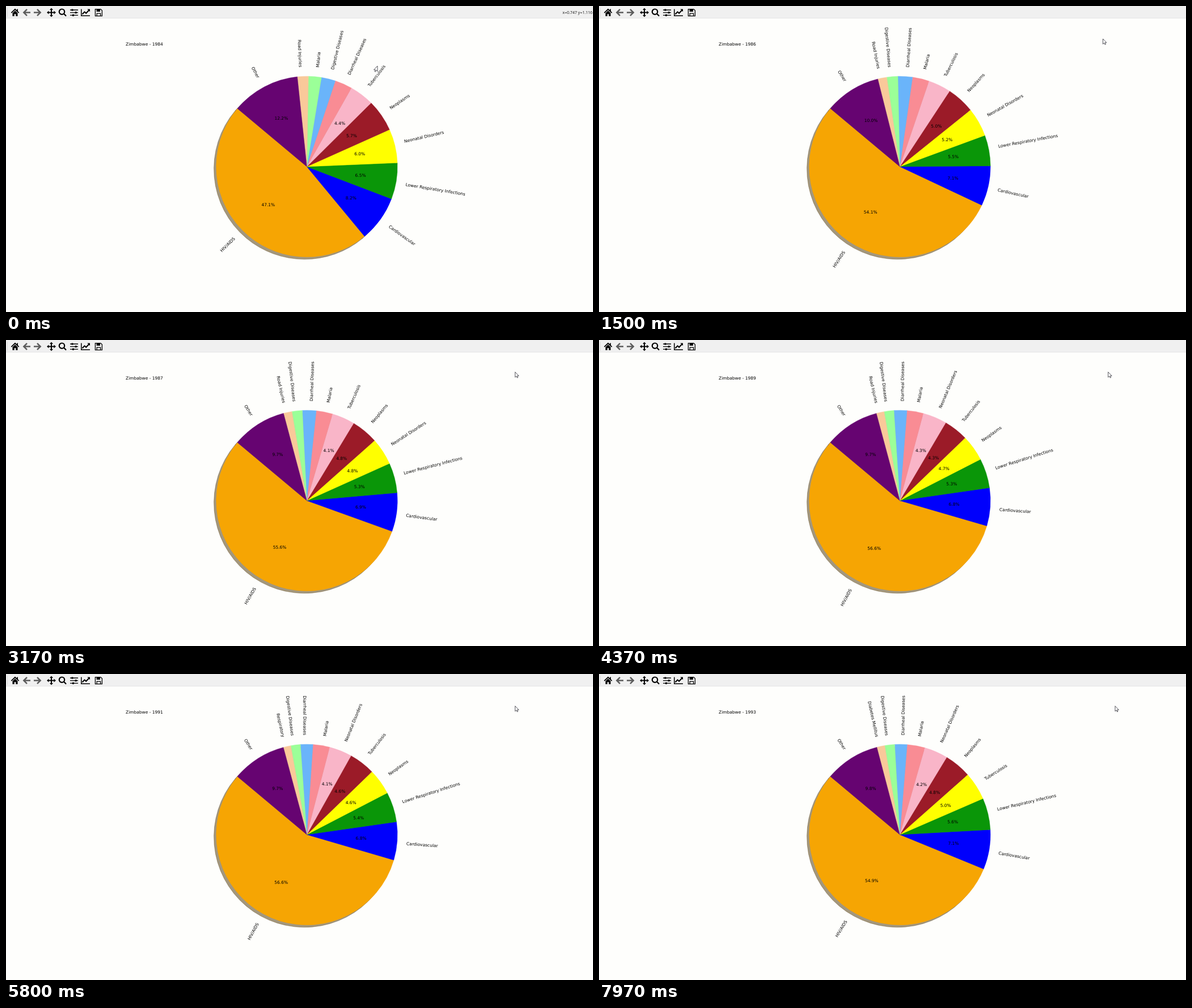
Write an HTML page with a canvas that moves like this. It is 1035 px wide and 541 px high and loops after 8000 ms.

```html
<!DOCTYPE html>
<html lang="en">
<head>
<meta charset="utf-8">
<title>Causes of death by year</title>
<style>
  html, body { margin: 0; width: 100%; height: 100%; overflow: hidden; background: #fefefc; }
  canvas { display: block; }
</style>
</head>
<body>
<canvas id="stage" width="1035" height="541"></canvas>
<script>
const ctx = document.getElementById('stage').getContext('2d');
const LOOP = 8000, FIRST_CHANGE = 637, YEAR_MS = 848;
const CX = 530.4, CY = 284, R = 159.8, START = 140, SHOWN = 10;
const FONT = '7.49px "DejaVu Sans", sans-serif';

const { exp, cos, sin, abs, min, max } = Math;
const rad = deg => deg * Math.PI / 180;
const clamp01 = p => min(1, max(0, p));
const smooth = p => clamp01(p) ** 2 * (3 - 2 * clamp01(p));
const polar = (deg, r) => [CX + r * cos(rad(deg)), CY - r * sin(rad(deg))];

// Steep rise to a plateau, then a late fall; percent, y = years since 1984.
const hivShare = y => 56.88 - 9.78 * exp(-0.555 * y ** 1.18) - 1.97 * exp(y - 9);

// Every other cause is a percentage of what remains.
const CAUSES = {
  'Cardiovascular': y => 15.5 + 0.025 * y,
  'Lower Respiratory Infections': y => 11.75 + 0.085 * y + 0.5 * exp(-y),
  'Neonatal Disorders': y => 11.42 - 2.07 * smooth((y - 1) / 6),
  'Neoplasms': y => 10.85 - 0.025 * y,
  'Tuberculosis': y => 8.25 + 0.25 * y + 0.65 * smooth((y - 1) / 6),
  'Malaria': y => 6.35 + 0.07 * y - 2 * exp(-2 * y),
  'Diarrheal Diseases': y => 5.85 - 0.11 * y,
  'Digestive Diseases': y => 3.9 + 0.85 * exp(-0.4 * y),
  'Road Injuries': y => 3.7 - 0.1 * y,
  'Respiratory': () => 3.05,
  'Diabetes Mellitus': y => 2.5 + 0.07 * y
};

// Colours follow rank; the last one is "Other".
const COLORS = ['#f6a503', '#0000fc', '#0a9608', '#ffff00', '#9b1b28', '#f9b5c8',
  '#f98c94', '#6ab4fa', '#9bff98', '#f9c99a', '#660471'];

// [path, line width, colour]; line width 0 means filled
const ICONS = [
  ['M9.3 12.2L16 5.8 22.7 12.2', 1.7],
  ['M11.5 12.4L16 8.2 20.5 12.4V18H17.3V14.2H14.7V18H11.5ZM19.2 5.5H21V9.5L19.2 8Z', 0],
  ['M43 11.5H32M37 5.8L31.3 11.5 37 17.2', 2.5, '#5c5c5c'],
  ['M49 11.5H60M55 5.8L60.7 11.5 55 17.2', 2.5, '#5c5c5c'],
  ['M74 11.5H86M80 5.5V17.5', 2],
  ['M80 3.5L83 7H77ZM80 19.5L83 16H77ZM72 11.5L75.5 8.5V14.5ZM88 11.5L84.5 8.5V14.5Z', 0],
  ['M103.2 10.2A4.7 4.7 0 1 1 93.8 10.2A4.7 4.7 0 1 1 103.2 10.2M102 13.6L106 17.7', 2.2],
  ['M113 7H127M113 11.7H127M113 16.4H127', 1.3],
  ['M115.4 5.4H118.4V8.6H115.4ZM121.6 10.1H124.6V13.3H121.6ZM117 14.8H120V18H117Z', 0],
  ['M132.8 5.5V17.2H148', 1.5],
  ['M134.5 14.5L138.5 10.3 141.2 12.8 146 7.8', 2],
  ['M143.3 5.6H148V10.3Z', 0],
  ['M157.4 5.6H167L169.4 8V17.6H157.4ZM160.2 17.6V13.2H166.6V17.6', 1.3],
  ['M159.6 5.6H166V10H159.6Z', 0]
].map(([d, width, color = '#000']) => [new Path2D(d), width, color]);

const ARROW = new Path2D('M0 0V9.3L2.2 7.4 3.6 10.3 5 9.7 3.6 6.8H6.5Z');
// Pointer moves: start ms, end ms, x, y at the end
const MOVES = [[450, 1400, 888.5, 58], [1950, 2150, 897.7, 56.6], [6150, 6350, 910, 56.6]];

function text(str, x, y, angle = 0, align = 'center') {
  ctx.save();
  ctx.translate(x, y);
  ctx.rotate(-rad(angle));
  ctx.textAlign = align;
  ctx.fillText(str, 0, 2.1);
  ctx.restore();
}

// The largest causes in order, then the rest as "Other", laid out counterclockwise.
function slicesFor(y) {
  const hiv = hivShare(y);
  const ranked = Object.entries(CAUSES)
    .map(([name, part]) => ({ name, share: part(y) * (100 - hiv) / 100 }))
    .concat({ name: 'HIV/AIDS', share: hiv })
    .sort((a, b) => b.share - a.share)
    .slice(0, SHOWN);
  const other = 100 - ranked.reduce((sum, s) => sum + s.share, 0);
  let angle = START;
  return [...ranked, { name: 'Other', share: other }].map((s, i) => {
    const from = angle;
    angle += s.share * 3.6;
    return { ...s, from, to: angle, mid: (from + angle) / 2, color: COLORS[i] };
  });
}

function wedge(s, shift, lineWidth) {
  ctx.beginPath();
  ctx.moveTo(CX - shift, CY + shift);
  ctx.arc(CX - shift, CY + shift, R, -rad(s.from), -rad(s.to), true);
  ctx.closePath();
  ctx.lineWidth = lineWidth;
  ctx.fill();
  ctx.stroke();
}

function shadow(s) {
  const dark = [1, 3, 5].map(i => parseInt(s.color.slice(i, i + 2), 16) * 0.3);
  ctx.fillStyle = ctx.strokeStyle = `rgba(${dark},0.5)`;
  wedge(s, 4, 0.7);
}

function face(s) {
  ctx.fillStyle = ctx.strokeStyle = s.color;
  wedge(s, 0, 0.4);
}

// The bounding box of the turned label touches the anchor with its inner corner.
function outerLabel({ name, mid }) {
  const [x, y] = polar(mid, R * 1.1);
  const right = x > CX ? 1 : -1, down = y > CY ? 1 : -1;
  const w = ctx.measureText(name).width, h = 7.6;
  const c = abs(cos(rad(mid))), s = abs(sin(rad(mid)));
  text(name, x + right * (w * c + h * s) / 2, y + down * (w * s + h * c) / 2,
    right > 0 ? mid : mid + 180);
}

function drawPie(y) {
  const slices = slicesFor(y);
  ctx.lineJoin = 'round';
  slices.forEach(shadow);
  slices.forEach(face);
  ctx.fillStyle = '#000';
  ctx.font = FONT;
  for (const s of slices) {
    const percent = s.share.toFixed(1);
    outerLabel(s);
    if (percent > 4) text(percent + '%', ...polar(s.mid, R * 0.6));
  }
}

function drawToolbar() {
  ctx.fillStyle = '#f0f0f0';
  ctx.fillRect(0, 0, 1035, 21.5);
  ctx.fillStyle = '#dedede';
  ctx.fillRect(0, 21, 1035, 0.7);
  ctx.fillRect(2, 3, 1, 16);
  ctx.lineJoin = 'miter';
  for (const [path, width, color] of ICONS) {
    ctx.fillStyle = ctx.strokeStyle = color;
    ctx.lineWidth = width;
    width ? ctx.stroke(path) : ctx.fill(path);
  }
}

function drawPointer(t) {
  let x = 655, y = 106;
  for (const [start, end, toX, toY] of MOVES) {
    const e = smooth((t - start) / (end - start));
    x += (toX - x) * e;
    y += (toY - y) * e;
  }
  const dataX = (x - 535.5) / 160, dataY = (284.5 - y) / 160;
  const inAxes = dataX < 1.25 && dataY < 1.25;
  if (inAxes) {
    ctx.font = '7px "Open Sans", sans-serif';
    ctx.fillStyle = '#111';
    text(`x=${dataX.toFixed(3)} y=${dataY.toFixed(3)}`, 1034, 11.5, 0, 'right');
  }
  ctx.save();
  ctx.translate(x, y);
  if (inAxes) ctx.scale(-1, 1);
  ctx.fillStyle = '#fff';
  ctx.strokeStyle = '#2c2c34';
  ctx.lineWidth = 0.8;
  ctx.fill(ARROW);
  ctx.stroke(ARROW);
  ctx.restore();
}

function draw(t) {
  const y = max(0, Math.floor((t - FIRST_CHANGE) / YEAR_MS) + 1);
  ctx.fillStyle = '#fefefc';
  ctx.fillRect(0, 0, 1035, 541);
  drawToolbar();
  drawPie(y);
  text('Zimbabwe - ' + (1984 + y), 211, 67.5, 0, 'left');
  drawPointer(t);
}

const begin = performance.now();
function tick() {
  draw((performance.now() - begin) % LOOP);
  requestAnimationFrame(tick);
}
tick();
</script>
</body>
</html>
```
